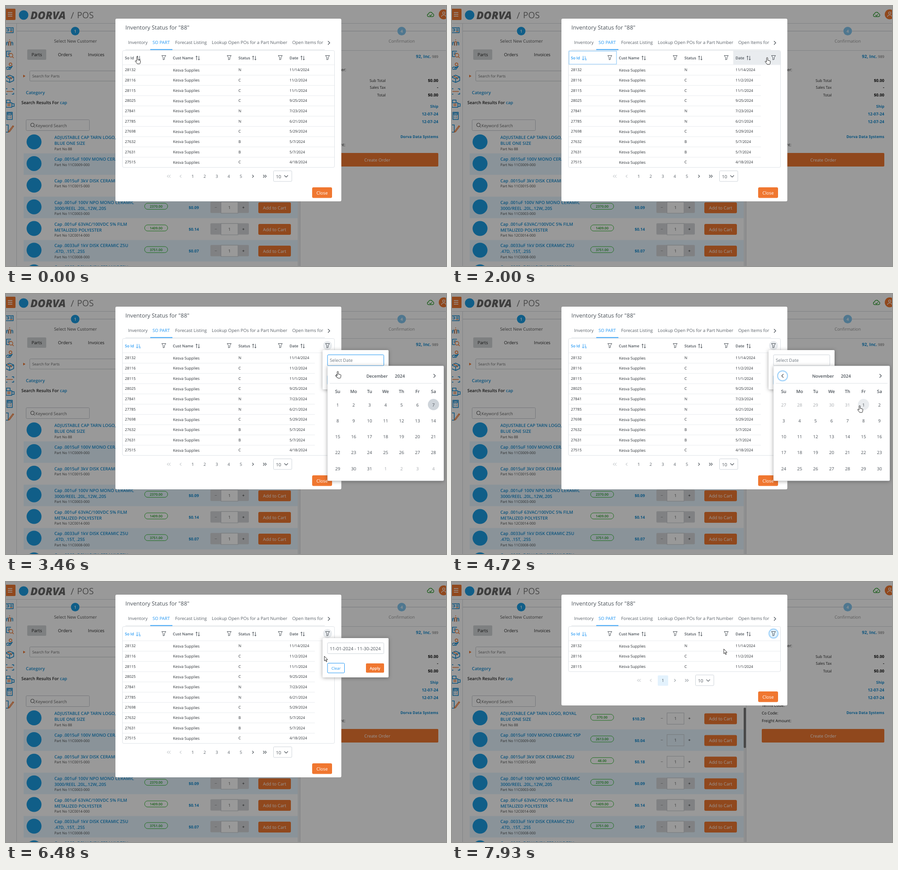
An HTML page for the animation above (8 s loop, 973 by 575 pixels).

```html
<!DOCTYPE html>
<html lang="en">
<head>
<meta charset="utf-8">
<title>Inventory status</title>
<style>
html, body { margin: 0; width: 100%; height: 100%; overflow: hidden; background: #999; }
svg { display: block; width: 973px; height: 575px; font-family: "Open Sans", "Noto Sans", sans-serif; text-rendering: geometricPrecision; }
.shade { filter: drop-shadow(0 1px 4px rgba(0, 0, 0, .35)); }
</style>
</head>
<body>
<svg viewBox="0 0 973 575"><g id="page"></g><rect width="973" height="575" fill="#000" opacity=".4"/><g id="live"></g></svg>
<script>
const BLUE = '#2196f3', RING = '#a6d5fa', PALE = '#e3f2fd', GREY = '#e9ecef', INK = '#495057', DARK = '#2b3035';
const ORANGE = '#f07730', LINK = '#118ad0', DISC = '#1b9de2', EDGE = '#ced4da';

// Drawing helpers; text is centred on y by its cap height
const T = (x, y, s, size, fill = DARK, weight = 400, anchor = 'start') =>
  `<text x="${x}" y="${y + size * .357}" font-size="${size}" fill="${fill}" font-weight="${weight}" text-anchor="${anchor}">${s}</text>`;
const M = (x, y, s, size, fill, weight) => T(x, y, s, size, fill, weight, 'middle');
const E = (x, y, s, size, fill, weight) => T(x, y, s, size, fill, weight, 'end');
const R = (x, y, w, h, fill, r = 0, stroke = 'none', sw = 1) =>
  `<rect x="${x}" y="${y}" width="${w}" height="${h}" rx="${r}" fill="${fill}" stroke="${stroke}" stroke-width="${sw}"/>`;
const C = (x, y, r, fill, stroke = 'none', sw = 1) =>
  `<circle cx="${x}" cy="${y}" r="${r}" fill="${fill}" stroke="${stroke}" stroke-width="${sw}"/>`;
const P = (x, y, d, stroke = INK, sw = 1, fill = 'none') =>
  `<path transform="translate(${x} ${y})" d="${d}" stroke="${stroke}" stroke-width="${sw}" fill="${fill}" stroke-linejoin="round"/>`;

const LEFT = 'M2-4l-4 4 4 4', RIGHT = 'M-2-4l4 4-4 4', DOWN = 'M-4-2l4 4 4-4';
const LEFT2 = 'M0-3l-3 3 3 3M4-3l-3 3 3 3', RIGHT2 = 'M0-3l3 3-3 3M-4-3l3 3-3 3';
const FUNNEL = 'M-4.5-4.5h9L1.5 0v4L-1.5 5V0z';
const SORT = 'M-2.5 4.5v-9m-2 2.2l2-2.2 2 2.2M2.5-4.5v9m-2-2.2l2 2.2 2-2.2';
const SORT_DOWN = 'M-3 -4.5v9m-2-2.2l2 2.2 2-2.2M.5-3.5h1.5M.5-1h2.5M.5 1.5h3.5M.5 4h4.5';
const SORT_UP = 'M-3 4.5v-9m-2 2.2l2-2.2 2 2.2M.5-3.5h1.5M.5-1h2.5M.5 1.5h3.5M.5 4h4.5';

const items = [
  ['88', '370.00', '$10.29', 'ADJUSTABLE CAP TARN LOGO, ROYAL', 'BLUE ONE SIZE'],
  ['11C0009-000', '2613.00', '$0.04', 'Cap .0015uF 100V MONO CERAMIC Y5P'],
  ['11C0015-000', '48.00', '$0.18', 'Cap .0015uF 3kV DISK CERAMIC Z5U'],
  ['11C0003-000', '2370.00', '$0.09', 'Cap .001uF 100V NPO MONO CERAMIC', '3000/REEL .20L,.12W,.20S'],
  ['12C0014-000', '1409.00', '$0.14', 'Cap .001uF 63VAC/100VDC 5% FILM', 'METALIZED POLYESTER'],
  ['11C0008-000', '3751.00', '$0.07', 'Cap .0033uF 1kV DISK CERAMIC Z5U', '.47D, .15T, .25S'],
  ['11C0012-000', '1260.00', '$0.11', 'Cap .0068uF 3kV DISK CERAMIC Z5U']
];

function item([part, stock, price, ...lines], i) {
  const y = 301 + 47.9 * i, last = y - 10.5 + 13 * (lines.length - 1);
  let s = i % 2 ? R(39, y - 23, 606, 47.5, '#e6f5ff') : '';
  s += C(62, y - .5, 16.5, DISC);
  lines.forEach((l, k) => s += T(107, y - 10.5 + 13 * k, l, 9.55, LINK, 600));
  s += T(107, last + 12.3, 'Part No ' + part, 7.9, '#444');
  s += R(306.5, y - 8.5, 51, 13.5, 'none', 6.7, '#2eb82e') + M(332, y - 1.7, stock, 7.6, '#1f9d1f', 600);
  s += E(426.5, y + 1.5, price, 8.8, LINK, 700);
  if (i > 2) s += R(452, y - 12, 85, 25, '#d4d7da', 2);
  s += R(475.5, y - 11.5, 37.5, 25, i > 2 ? '#fff' : 'none', 0, '#c4c8cc');
  s += M(464, y + 1, '−', 9.5, '#777') + M(494, y + 1, '1', 9, '#555') + M(525, y + 1, '+', 9.5, '#222');
  return s + R(558, y - 10.5, 72, 24, ORANGE, 3) + M(594, y + 1.7, 'Add to Cart', 9.75, '#fff');
}

function sidebar() {
  const icons = [
    [53, 'M-2-5H16V6H-2M1-2h5v4H1M9-2h5M9 1h5', 'M9 3.500h5'],
    [80, 'M1 7V1h4v6M11 7V1h4v6M3-2v1M13-2v1', 'M6 8V-1h4v9M8-6v2'],
    [107, 'M1 5V-7h10M1 5h6M4-3h5M4 0h3', 'M7 2a4 4 0 1 0 8 0a4 4 0 1 0-8 0M14 5l3 3'],
    [134, 'M-2 6l5-5h6l-3 3 8-5-5 7H1', 'M7-5a3 3 0 1 0 6 0a3 3 0 1 0-6 0'],
    [161, 'M8-8l9 4v8l-9 4-9-4v-8zM-1-4l9 4 9-4M8 0v8', 'M3-6l9 4v3'],
    [189, 'M-1-3v-3h4M13-6h4v3M17 3v3h-4M3 6h-4v-3', 'M1 0h14'],
    [216, 'M1-2V-8h8v6M0-2h13V8H0zM13 0h5v6h-5', 'M3 1h7M3 4h7'],
    [243, 'M2-8h12V8H2zM4-6h8v3H4zM4 0h2M8 0h2M4 4h2M8 4h2', 'M11 0h1M11 4h1'],
    [271, 'M-1-8H5V8H-1', 'M6 6l9-12 2 1-9 12-3 1z']
  ];
  return icons.map(([y, a, b]) => P(0, y, a, LINK, 1.5) + P(0, y, b, ORANGE, 1.4)).join('');
}

function page() {
  let s = R(0, 0, 973, 575, '#fff') + R(0, 38, 973, 1, '#d5d8db') + R(23, 39, 1, 536, '#d5d8db');
  s += R(-4, 6, 25, 25, ORANGE, 2) + P(4, 14.5, 'M0 0h10M0 4h10M0 8h10', '#fff', 1.3) + sidebar();
  s += C(39, 20, 10.5, DISC);
  s += `<g font-style="italic">${T(54, 20.5, 'DORVA', 23.5, '#666', 800)}</g>` + T(143, 20.5, '/', 20, '#777') + T(157, 20.5, 'POS', 19.2, '#777');
  s += P(939, 19, 'M-4 4.500a3 3 0 0 1-.5-6 4.500 4.500 0 0 1 8.700-.7 3.400 3.400 0 0 1 0 6.700zM-2.500 1l2 2 3.500-3.500', '#35a035', 1.3);
  s += C(968, 18.500, 11, ORANGE) + C(968, 15.500, 2.500, 'none', '#fff', 1.2) + P(968, 24, 'M-5 0q0-4 5-4t5 4', '#fff', 1.2);
  s += R(24, 55, 949, 1, '#c9cdd1') + C(153, 55.5, 9.5, DISC) + M(153, 55.5, '1', 9, '#fff', 600) + M(153.500, 78, 'Select New Customer', 9.55, '#555');
  s += C(875, 55.5, 9.5, '#84c5ee') + M(875, 55.5, '4', 9, '#fff', 600) + M(875, 78, 'Confirmation', 9.45, '#999');
  s += R(47, 96, 42, 23, '#d2d4d6', 2) + M(68, 108, 'Parts', 9.7, '#222', 500) + M(130.500, 108, 'Orders', 9.6, '#222', 500) + M(199.500, 108, 'Invoices', 9.7, '#222', 500);
  s += P(38, 155, 'M0-3l5 3-5 3z', 'none', 0, ORANGE) + R(52.500, 143.500, 580, 22.500, 'none', 2, '#c4c8cc') + T(58, 155, 'Search for Parts', 8.2, '#666');
  s += T(44, 192, 'Category', 9.7, LINK, 600) + T(34, 214, `Search Results For <tspan fill="${LINK}">cap</tspan>`, 9.4, '#222', 600);
  s += R(44.500, 251.500, 140, 24, 'none', 2, '#c4c8cc') + P(58.500, 263.500, 'M-4-.5a4 4 0 1 0 8 0a4 4 0 1 0-8 0M2.800 2.500l2.700 2.700', '#444') + T(65, 264.5, 'Keyword Search', 9.4, '#666');
  s += items.map(item).join('') + R(645, 278, 5, 297, '#eceeef') + R(645, 278, 5, 89, '#777', 2);
  s += R(650, 98, 1, 477, '#d5d8db') + R(650, 98, 323, 1, '#d5d8db');
  s += E(940, 112, '92, Inc.', 9.6, LINK, 700) + E(956, 112.4, '989', 8.2, '#666');
  s += E(752, 140.5, 'Sales Order:', 8.7, '#111', 500);
  [['Sub Total', 165, '$0.00'], ['Sales Tax', 180, '-'], ['Total', 197, '$0.00']].forEach(([a, y, b]) =>
    s += E(839.500, y, a, 8.3, '#222') + E(956, y, b, 9, '#111', 700));
  [['Ship', 222], ['12-07-24', 238.5], ['12-07-24', 255.5], ['Dorva Data Systems', 289.5]].forEach(([a, y], i) =>
    s += E(956, y, a, i % 3 ? 9 : 8.4, LINK, 700));
  ['Terms Code:', 'Co Code:', 'Freight Amount:'].forEach((a, i) => s += T(685, 272.500 + 17 * i, a, 8.7, '#111', 500));
  return s + R(685, 325, 271, 30, ORANGE, 2) + M(821, 341, 'Create Order', 9.5, '#fff');
}

// Moments at which a click takes effect
const SORT1 = 200, SORT2 = 1050, MENU = 2300, CAL = 3070, PREV = 4190, FIRST = 5100, LAST = 5480, HIDE = 6370, APPLY = 7000, DONE = 7200;

const HAND = 'M0 1.200a1.300 1.300 0 0 1 2.600 0V6l4.600 1q1.400.4 1.200 2l-.7 4.500q-.2 1-.9 1.500H1.500L-3 9.500q-.8-1.200.6-1.600.8-.1 2.400 1.600z';
const ARROW = 'M0 0V10.500l2.400-2.200 1.800 4.200 1.600-.7-1.800-4h3.300z';
const BEAM = 'M-2.500-5h5M0-5v9M-2.500 4h5';
const path = [
  [0, 289, 113, HAND], [200, 289, 113, HAND], [380, 294, 115, HAND], [1340, 294, 115, HAND], [1740, 520, 128, HAND],
  [2100, 710, 113, HAND], [2330, 710, 113, HAND], [2660, 738, 150, BEAM], [3150, 738, 150, HAND], [3830, 730, 180, HAND],
  [4300, 730, 180, HAND], [4700, 900, 247, HAND], [5130, 902, 247, HAND], [5420, 942, 384, HAND], [5500, 942, 384, HAND],
  [6150, 704, 164, ARROW], [6560, 704, 164, ARROW], [6930, 816, 188, HAND], [7500, 816, 188, ARROW], [7930, 601, 148, ARROW], [8000, 601, 148, ARROW]
];

function pointer(t) {
  const i = path.findIndex((k, n) => t < path[n + 1][0]), [t0, x0, y0, art] = path[i], [t1, x1, y1] = path[i + 1];
  const u = 1 - (1 - (t - t0) / (t1 - t0)) ** 2;
  return { x: x0 + (x1 - x0) * u, y: y0 + (y1 - y0) * u, art };
}

const rows = [
  [28132, 'N', '11/14/2024'], [28116, 'C', '11/2/2024'], [28115, 'C', '11/1/2024'], [28025, 'C', '9/25/2024'], [27841, 'N', '7/23/2024'],
  [27785, 'N', '6/21/2024'], [27698, 'C', '5/29/2024'], [27632, 'B', '5/7/2024'], [27631, 'B', '5/7/2024'], [27515, 'C', '4/18/2024']
];
const heads = [['So Id', 258, 364, 293, 349], ['Cust Name', 364, 509, 424, 493.5], ['Status', 509, 622, 549, 606.5], ['Date', 622, 726, 656, 711]];

function table(t, p, n) {
  const sorted = t >= SORT1, dy = (n - 10) * 22.7;
  let s = R(257.5, 98.5, 469, 258.5 + dy, '#fff', 3, '#dee2e6');
  heads.forEach(([name, x, end, sx, fx], i) => {
    const mine = !i && sorted, icon = !mine ? SORT : t < SORT2 ? SORT_UP : SORT_DOWN;
    if (sorted && t < MENU && p.x >= x && p.x < end) s += R(x, 99, end - x, 30.5, GREY);
    if (mine && t < MENU) s += R(258.7, 99.700, 105, 29, 'none', 0, RING, 1.6);
    if (i === 3 && t >= MENU) {
      const ring = t < CAL || t >= DONE;
      s += C(711, 114, 10, t >= DONE ? PALE : GREY, ring ? RING : 'none', ring ? 2.4 : 0);
    }
    s += T(x + 5, 115, name, 8.5, mine ? BLUE : INK, 600) + P(sx, 115, icon, mine ? BLUE : INK) + P(fx, 114, FUNNEL, INK);
  });
  s += R(258, 129.500, 468, 1, GREY);
  const list = sorted && t < SORT2 ? [...rows].reverse() : rows;
  list.slice(0, n).forEach(([id, status, date], i) => {
    const y = 141.500 + 22.67 * i;
    s += T(263, y, id, 8.3, DARK, 500) + T(369.5, y, 'Kesva Supplies', 8.5, DARK, 500) + T(514, y, status, 8.3, DARK, 500) + T(627, y, date, 8.2, DARK, 500);
    if (i < n - 1) s += R(258, y + 11, sorted && t < DONE ? 425 : 468, 1, GREY);
  });
  return s;
}

function modal(t, p) {
  const n = t < DONE ? 10 : 3, dy = (n - 10) * 22.7, few = n < 10, y = 376.5 + dy;
  let s = R(242, 28, 499.5, 404 + dy, '#fff', 3) + T(264, 47.5, 'Inventory Status for "88"', 12.4, INK, 500);
  s += R(264, 96, 441, 1, '#dee2e6') + R(319, 95.500, 49, 1.700, BLUE);
  [['Inventory', 270], ['SO PART', 324], ['Forecast Listing', 374], ['Lookup Open POs for a Part Number', 455], ['Open Items for', 633]].forEach(([a, x], i) =>
    s += T(x, 81, a, 9.72, i === 1 ? BLUE : '#5c636a', 500));
  s += P(714, 81.500, RIGHT, INK, 1.2) + table(t, p, n);
  const x0 = few ? 413 : 359.5, pages = few ? 1 : 5, at = k => x0 + 26.65 * k;
  s += P(at(0), y, LEFT2, '#a5abb0') + P(at(1), y, 'M1.500-3l-3 3 3 3', '#a5abb0');
  if (few) s += R(455, y - 11, 23, 23, PALE, 2);
  for (let k = 1; k <= pages; k++) s += M(at(k + 1), y + .5, k, 9.3, k === 1 ? INK : '#5c636a', k === 1 ? 500 : 400);
  const off = few ? '#8d949a' : INK;
  s += P(at(pages + 2), y, 'M-1.500-3l3 3-3 3', off, 1.1) + P(at(pages + 3), y, RIGHT2, off, 1.1);
  const bx = few ? 538.5 : 591.500;
  s += R(bx, y - 12, 40.500, 23.500, '#fff', 2, EDGE) + T(bx + 5.500, y + .700, '10', 9.9, INK) + P(bx + 28, y, DOWN, INK, 1.1);
  return s + R(677, 401 + dy, 44, 23.500, ORANGE, 3) + M(699, 413 + dy, 'Close', 9.9, '#fff', 500);
}

// A panel that unfolds at a and fades out after b
function panel(t, a, b, top, body) {
  const grow = Math.min(1, (t - a) / 120 + .1), gone = Math.min(1, 1 - (t - b) / 100);
  if (t < a || gone <= 0) return '';
  return `<g class="shade" opacity="${Math.min(grow, gone)}" transform="translate(0 ${top}) scale(1 ${.8 + .2 * grow}) translate(0 ${-top})">${body}</g>`;
}

function menu(t) {
  const value = t < FIRST ? 'Select Date' : t < LAST ? '11-01-2024 -' : '11-01-2024 - 11-30-2024';
  return R(700, 124, 146, 87, '#fff', 2) +
    R(711, 134.5, 124.500, 24, '#fff', 2, t < PREV ? BLUE : EDGE) + T(716, 147, value, t < FIRST ? 9.75 : 10, t < FIRST ? '#6c757d' : INK) +
    R(711, 179.500, 37.500, 21.500, '#fff', 2, BLUE) + M(730, 190.500, 'Clear', 8.5, BLUE) +
    R(796, 180, 40, 20.500, ORANGE, 2) + M(816, 190.500, 'Apply', 8.6, '#fff', 600);
}

function calendar(t, p) {
  const dec = t < PREV, first = dec ? 1 : -4, size = dec ? 31 : 30;
  let s = R(711, 159, 257, 254, '#fff', 2, '#dfe3e6', .6) + R(716, 197, 247, 1, '#dee2e6');
  if (t >= PREV && t < FIRST) s += C(731, 181, 11, '#fff', RING, 2.4);
  s += P(731, 181, LEFT, INK, 1.2) + P(947.500, 181, RIGHT, INK, 1.2);
  s += M(820.500, 181.500, dec ? 'December' : 'November', 9.5, INK, 600) + M(871, 181.500, '2024', 9.7, INK, 600);
  ['Su', 'Mo', 'Tu', 'We', 'Th', 'Fr', 'Sa'].forEach((d, i) => s += M(733.500 + 35.3 * i, 215.500, d, 9.8, INK, 600));
  for (let i = 0; i < 35; i++) {
    const x = 733.500 + 35.3 * (i % 7), y = 245 + 35.25 * Math.floor(i / 7), d = first + i, inside = d > 0 && d <= size;
    const label = d < 1 ? d + 31 : d > size ? d - size : d;
    const picked = inside && t >= (d === 1 ? FIRST : LAST);
    if (picked) s += C(x, y - .5, 12.4, PALE);
    else if (inside && Math.hypot(p.x - x, p.y - y) < 14) s += C(x, y - .5, 12.4, GREY);
    else if (dec && d === 7) s += C(x, y - .5, 12.4, EDGE);
    if (d === 1 && picked) s += C(x, y - .5, 13.300, 'none', RING, 2.2);
    s += M(x, y + .3, label, 9.6, inside ? INK : '#a4a8ac');
  }
  return s;
}

const live = document.getElementById('live');
document.getElementById('page').innerHTML = page();

function draw(now) {
  const t = now % 8000, p = pointer(t);
  live.innerHTML = modal(t, p) + panel(t, MENU, APPLY, 124, menu(t)) + panel(t, CAL, HIDE, 159, calendar(t, p)) +
    P(p.x, p.y, p.art, '#111', .9, p.art === BEAM ? 'none' : '#fff');
}
const start = performance.now();
function tick() {
  draw(performance.now() - start);
  requestAnimationFrame(tick);
}
tick();
</script>
</body>
</html>
```
